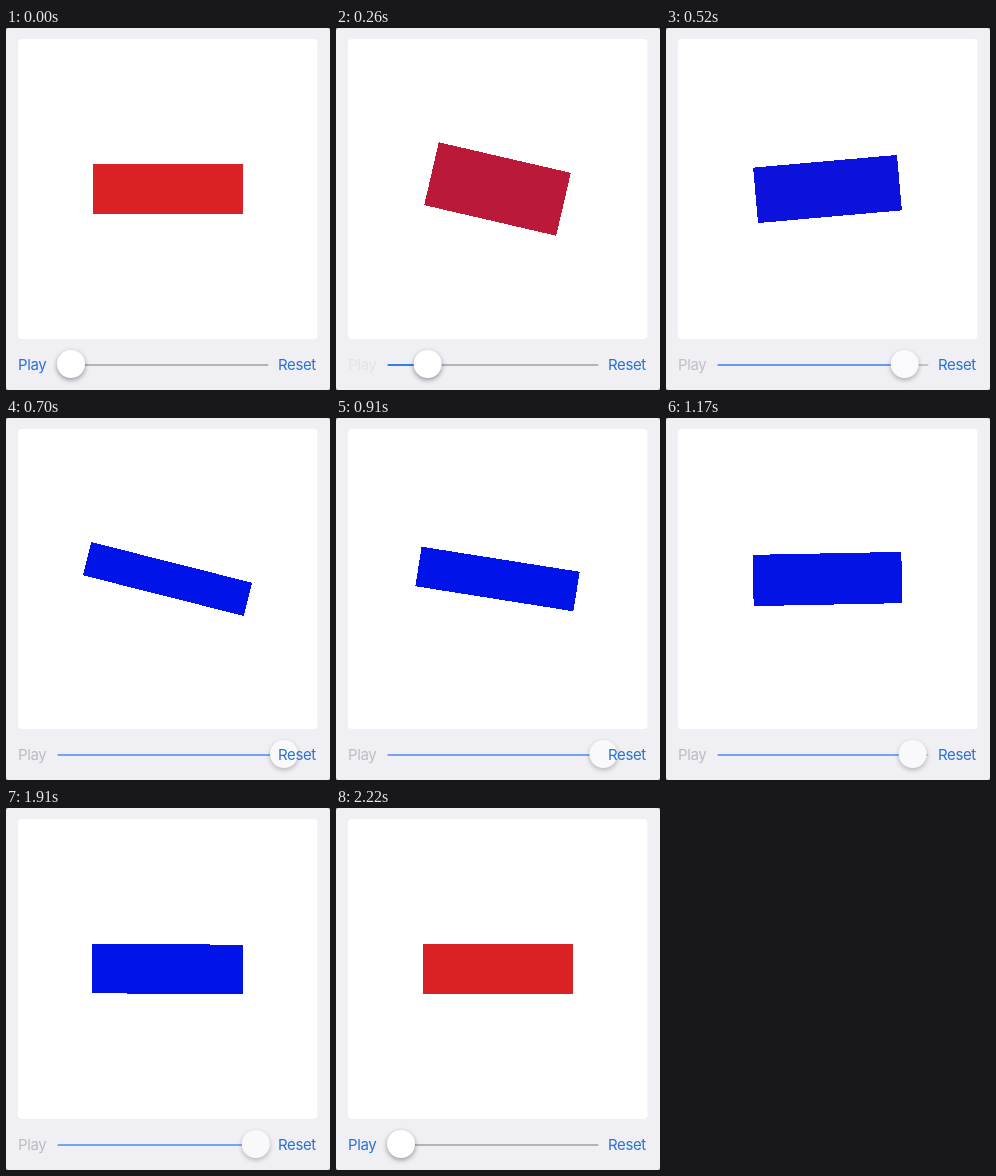
Recreate the animation shown at these times as an HTML page. Size 324 by 362 pixels, loop 2.27 s.

```html
<!DOCTYPE html>
<html lang="en">
<head>
<meta charset="utf-8">
<title>Spring slider</title>
<style>
  html, body { margin: 0; width: 324px; height: 362px; overflow: hidden; background: #8c8c90; }
  svg { display: block; }
  text { font: 15px Inter, Roboto, sans-serif; letter-spacing: -.4px; fill: #2b72d0; }
  #knob { filter: drop-shadow(0 2px 2.5px rgba(0, 0, 0, .38)); }
</style>
</head>
<body>
<svg width="324" height="362">
  <rect width="324" height="362" rx="3" fill="#efeff4"/>
  <rect x="12" y="11" width="299.5" height="300" rx="4" fill="#fff"/>
  <rect id="box" shape-rendering="crispEdges"/>
  <g id="slider">
    <rect x="51.5" y="336" width="211" height="2" rx="1" fill="#b3b3b8"/>
    <rect id="fill" x="51.5" y="336" height="2" rx="1" fill="#347df5"/>
    <circle id="knob" cy="336" r="14" fill="#fff"/>
  </g>
  <text id="play" x="12" y="342">Play</text>
  <text x="272" y="342">Reset</text>
</svg>
<script>
const LOOP = 2270, PRESS = 40, START = 166, RESET = 2000;
const [box, slider, fill, knob, play] =
  ['box', 'slider', 'fill', 'knob', 'play'].map(id => document.getElementById(id));

const set = (el, attrs) => {
  for (const name in attrs) el.setAttribute(name, attrs[name]);
};
const ramp = (t, from, to) => Math.min(1, Math.max(0, (t - from) / (to - from)));
const mix = (a, b, k) => a + (b - a) * k;

// Underdamped spring from 0 to 1: stiffness 40, damping ratio 0.5
function spring(seconds) {
  if (seconds <= 0) return 0;
  const ratio = .5, omega = Math.sqrt(40), root = Math.sqrt(1 - ratio * ratio);
  const phase = omega * root * seconds;
  return 1 - Math.exp(-ratio * omega * seconds) *
    (Math.cos(phase) + ratio / root * Math.sin(phase));
}

const RED = [218, 33, 36], PURPLE = [122, 10, 98], BLUE = [0, 19, 232], MIDDLE = .43;
function tint(p) {
  const [a, b, k] = p < MIDDLE
    ? [RED, PURPLE, ramp(p, 0, MIDDLE)]
    : [PURPLE, BLUE, ramp(p, MIDDLE, 1)];
  return `rgb(${a.map((v, i) => Math.round(mix(v, b[i], k)))})`;
}

function draw(t) {
  const idle = t < PRESS || t >= RESET;
  const p = idle ? 0 : spring((t - START) / 1000);

  const w = 150 - 100 * p, h = 50 + 100 * p;
  set(box, {
    x: -w / 2, y: -h / 2, width: w, height: h, fill: tint(p),
    transform: `translate(161.5 161) rotate(${90 * p})`
  });

  const x = 65 + 184 * p;
  set(knob, { cx: x });
  set(fill, { width: p > 0 ? x - 51.5 : 0 });
  slider.style.opacity = idle ? 1 : mix(1, .65, ramp(t, 300, 600));

  // The pressed label dims, then returns in its disabled grey
  const pressed = t < START;
  play.style.fill = idle || pressed ? '' : '#bcbcc1';
  play.style.opacity = idle ? 1
    : pressed ? mix(1, .2, ramp(t, PRESS, START))
    : mix(.25, 1, ramp(t, 330, 540));
}

function tick() {
  draw(performance.now() % LOOP);
  requestAnimationFrame(tick);
}
tick();
</script>
</body>
</html>
```
